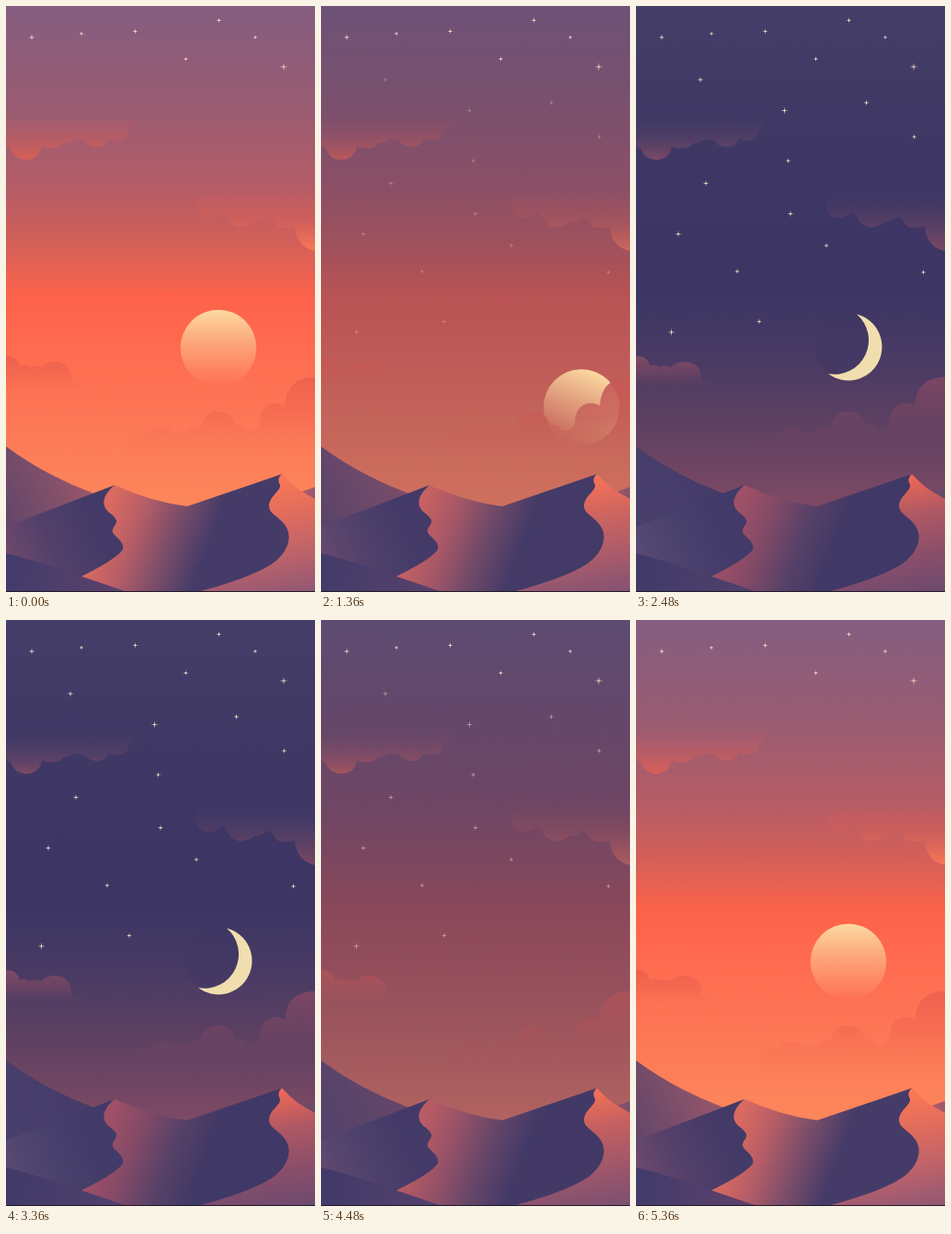
An HTML page that plays this animation: 336x636 px, repeating every 5440 ms.

```html
<!DOCTYPE html>
<html lang="en">
<head>
<meta charset="utf-8">
<title>Desert day and night</title>
<style>
  html, body { margin: 0; width: 100%; height: 100%; overflow: hidden; background: #41395f; }
  svg { display: block; width: 100%; height: 100%; }
</style>
</head>
<body>
<svg viewBox="0 0 336 636" preserveAspectRatio="none">
  <defs id="defs"></defs>
  <rect width="336" height="636" fill="url(#sky)"/>

  <g id="orbit">
    <circle cx="231" cy="371" r="41.3" fill="url(#sun)"/>
    <g transform="rotate(180 91 538) translate(231 370)">
      <circle r="36.3" fill="#413764" opacity=".55"/>
      <path d="M9 -35.4A36.5 36.5 0 1 1 -22 29.1A37 37 0 0 0 9 -35.4Z" fill="#f1deae"/>
    </g>
  </g>
  <g id="stars" fill="#ffe0c8"></g>

  <!-- clouds -->
  <path fill="url(#cloudA)" d="M0 120H143Q143 131 134 134Q133 146 122 146Q116 147 112 144Q108 153 98 153Q89 152 86 147
    Q80 144 75 145Q68 149 62 149Q58 155 50 154Q43 155 39 152Q37 166 22 167Q8 166 5 154Q2 155 0 151Z"/>
  <path fill="url(#cloudB)" d="M336 200H220Q207 204 207 215Q207 229 219 230Q228 231 235 223Q240 225 242 232Q247 240 256 240
    Q267 239 270 234Q277 236 283 229Q290 230 292 236Q297 242 304 240Q309 242 314 239Q315 261 336 266Z"/>
  <path fill="url(#cloudC)" d="M0 380Q13 380 15 391Q21 388 25 392Q31 389 38 392Q43 386 54 386Q70 388 71 403
    Q70 406 73 409Q85 406 87 420H0Z"/>
  <path fill="url(#cloudD)" d="M134 490V474Q136 463 149 464Q154 467 156 464Q161 457 170 457Q179 458 183 464Q188 461 195 462
    Q203 455 211 457Q216 440 231 440Q246 441 250 456Q257 452 262 461Q270 462 276 454Q276 433 292 431
    Q299 431 303 434Q305 405 332 403H336V490Z"/>

  <!-- dunes -->
  <path fill="url(#farLeft)" d="M0 478Q42 509 95 529L118 540V600H0Z"/>
  <path fill="url(#farRight)" d="M310 530Q324 527 336 522V560H310Z"/>
  <path fill="url(#middle)" d="M118 520Q158 538 197 543L300 508L320 636H70L82 610L100 545L104 530Z"/>
  <path fill="url(#leftFace)" d="M118 520L0 565V636H70L82 619Q119 601 127 590Q129 584 120 576Q112 570 119 563
    Q123 558 114 551C102 543 105 531 118 520Z"/>
  <path fill="url(#nearLeft)" d="M0 594Q36 603 82 619L132 636H0Z"/>
  <path fill="url(#rightFace)" d="M300 508Q312 521 322 527L336 535V636H208Q268 620 290 605C308 592 312 574 303 563
    C297 554 285 551 286 541C288 531 299 526 298 520Q294 513 300 508Z"/>
  <rect y="635" width="336" height="1" fill="#211a2a"/>
</svg>
<script>
const NS = 'http://www.w3.org/2000/svg';
const LOOP = 5440, TURN = 1600;
const DIM = 720, SUNSET = 875, DAWN = 3780;
const $ = id => document.getElementById(id);

function add(parent, tag, attrs) {
  const el = document.createElementNS(NS, tag);
  for (const k in attrs) el.setAttribute(k, attrs[k]);
  return parent.appendChild(el);
}

const rgb = hex => [0, 2, 4].map(i => parseInt(hex.slice(i, i + 2), 16));
const tinted = [];

// Each stop: offset, day colour, night colour, opacity
function gradient(id, [x1, y1, x2, y2], stops) {
  const g = add($('defs'), 'linearGradient', { id, x1, y1, x2, y2, gradientUnits: 'userSpaceOnUse' });
  for (const [offset, day, night, alpha = 1] of stops) {
    const el = add(g, 'stop', { offset, 'stop-opacity': alpha });
    tinted.push({ el, day: rgb(day), night: rgb(night) });
  }
}

gradient('sky', [0, 0, 0, 540], [
  [0, '855d80', '443e69'], [.2, '995c72', '403965'], [.37, 'b65c66', '3e3765'],
  [.48, 'd45f58', '3d3664'], [.585, 'fd634a', '3d3665'], [.7, 'ff6c50', '483a64'],
  [.83, 'fd7756', '5c4062'], [1, 'fc865b', '7d4964']
]);
gradient('sun', [0, 330, 0, 410], [
  [0, 'fcd9a0', 'fcd9a0'], [1, 'fcd09a', 'fcd09a', .03]
]);
gradient('cloudA', [0, 120, 0, 167], [
  [0, 'b85d66', '493d68', 0], [.5, 'c15d60', '5a4267', .6], [1, 'd96056', '7d4a65']
]);
gradient('cloudB', [0, 200, 0, 266], [
  [0, 'cc5e5b', '483b66', 0], [.5, 'd2605a', '5c4166', .7], [1, 'fb7855', '7b4863']
]);
gradient('cloudC', [0, 380, 0, 420], [
  [0, 'ea5e4d', '894c65', .9], [.5, 'f1654f', '704562', .7], [1, 'fb7050', '543c64', 0]
]);
gradient('cloudD', [0, 403, 0, 490], [
  [0, 'ee614d', '7e4763', .95], [.5, 'f56b51', '704462', .75], [1, 'fb7956', '674261', 0]
]);
gradient('farLeft', [0, 560, 95, 520], [
  [0, '634669', '493f6c'], [.6, '82506a', '463d6a'], [1, '9c5769', '433a67']
]);
gradient('farRight', [310, 0, 336, 0], [[0, 'b05f6a', '7a4c68'], [1, 'a0586a', '694969']]);
gradient('leftFace', [0, 605, 95, 565], [
  [0, '6f496c', '594b75'], [.5, '53406a', '4a416e'], [1, '443a68', '423a68']
]);
gradient('nearLeft', [0, 620, 120, 636], [[0, '423b6b', '413a69'], [1, '5c416a', '4f406c']]);
gradient('middle', [104, 565, 212, 605], [
  [0, 'd96a60', '9f5066'], [.3, 'b85e66', '844a67'], [.65, '7b4d69', '574167'], [1, '453b68', '403866']
]);
gradient('rightFace', [296, 512, 318, 640], [
  [0, 'fb7855', 'ed6855'], [.3, 'e26c5d', 'b05863'], [.65, 'bd626a', '8b4e6a'], [1, '8f5774', '6b4a6f']
]);

// x, y, reach
const star = ([x, y, r]) => add($('stars'), 'path', {
  d: `M0 ${-r}L.5 -.5L${r} 0L.5 .5L0 ${r}L-.5 .5L${-r} 0L-.5 -.5Z`,
  transform: `translate(${x} ${y})`
});
[[28, 34, 3.5], [82, 30, 2.6], [140.5, 27.5, 3], [231.5, 15.5, 3],
 [271, 34, 2.6], [195.5, 57.5, 2.8], [302, 66, 4.6]].forEach(star);
const nightStars = [
  [70, 80, 3.5], [161.5, 113.5, 4], [250.5, 105, 3.2], [302.5, 142, 3], [165.5, 168, 3],
  [76, 192.5, 3.3], [168, 225.5, 3.4], [207, 260, 3], [46, 247.5, 3.6], [110, 288, 3],
  [312.5, 289, 3], [134, 342.5, 3], [38.5, 354, 4]
].map(star);

const progress = (time, from) => Math.min(1, Math.max(0, (time - from) / TURN));
const smooth = u => u * u * (3 - 2 * u);
const bez = (t, a, b) => 3 * (1 - t) ** 2 * t * a + 3 * (1 - t) * t * t * b + t ** 3;

// Slight wind-up, fast swing, long settle
function swing(u) {
  if (u === 0 || u === 1) return u;
  let lo = 0, hi = 1;
  for (let i = 0; i < 24; i++) {
    const mid = (lo + hi) / 2;
    if (bez(mid, .56, .27) < u) lo = mid; else hi = mid;
  }
  return bez(lo, -.13, 1);
}

function draw(time) {
  const dawn = progress(time, DAWN);
  const night = smooth(progress(time, DIM)) - smooth(dawn);
  const angle = 180 * (swing(progress(time, SUNSET)) + swing(dawn));
  $('orbit').setAttribute('transform', `rotate(${angle} 91 538)`);
  for (const { el, day, night: dark } of tinted) {
    const mix = day.map((c, i) => Math.round(c + (dark[i] - c) * night));
    el.setAttribute('stop-color', `rgb(${mix})`);
  }
  for (const s of nightStars) s.setAttribute('opacity', night);
}

const start = performance.now();
function tick() {
  draw((performance.now() - start) % LOOP);
  requestAnimationFrame(tick);
}
tick();
</script>
</body>
</html>
```
